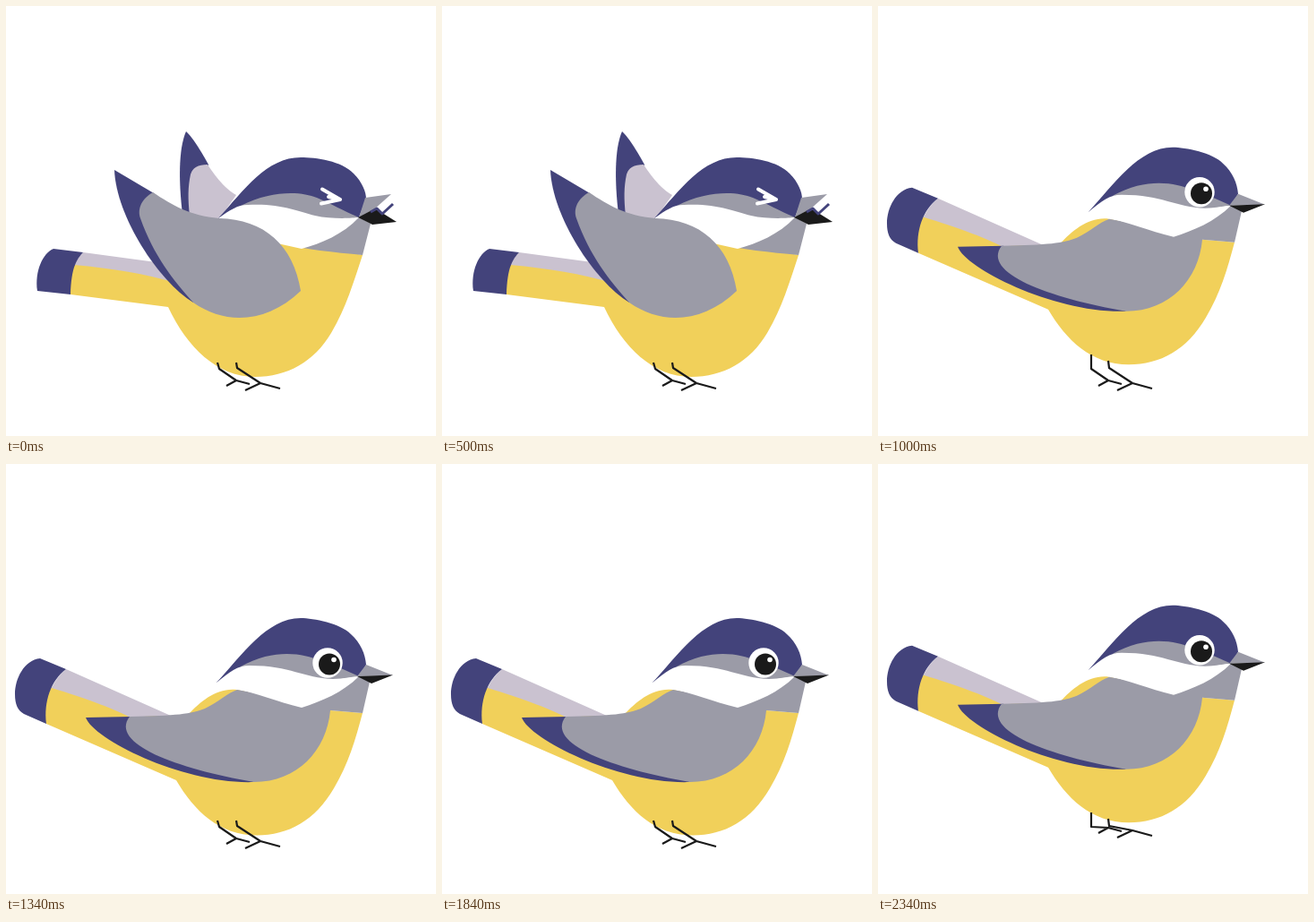
These frames come from a looping animation (480x480 px, 2510 ms). An HTML page:

```html
<!DOCTYPE html>
<html lang="en">
<head>
<meta charset="utf-8">
<title>Hopping bird</title>
<style>
html, body { margin: 0; width: 100%; height: 100%; overflow: hidden; background: #fff; }
svg { display: block; width: 100vw; height: 100vh; }
.blue { fill: #43437b; }
.grey { fill: #9b9ba7; }
.gold { fill: #f1d05a; }
.lilac { fill: #cac2d0; }
.ink { fill: #1a1a1a; }
.white { fill: #fff; }
.line { fill: none; stroke-linejoin: round; }
#legs { stroke: #1a1a1a; stroke-width: 2.2; }
</style>
</head>
<body>
<svg viewBox="0 0 480 480">
  <g id="rest">
    <path class="gold" d="M45 290L190 353C210 387 238 414.500 280 414.500C315 414.500 345 398 366 362C382 335 390 308 398 278L362 275L258 252C236 249 217 265 204 279L184 282L60 240L36 266Z"/>
    <path class="lilac" d="M67 229L184 281L138 282.500C115 271 90 262 51 250Q57 237 67 229Z"/>
    <path class="blue" d="M38 217L67 229C50 242 42 265 45 290L20 279C13 275 10 268 10 257C10 240 20 219 38 217Z"/>
    <path class="blue" d="M89 283L140 282L180 305L277 355C200 358 98 308 89 283Z"/>
    <path class="grey" d="M138 282C190 281 207 279 222 273C238 265 247 256 258 252L330 265L394 236L406 243L398 278L362 275C358 320 325 355 277 355C190 340 115 312 138 282Z"/>
    <path class="blue" d="M235 244C263 214 291 172 329 172C343 172 374 178 385 190C396 200 401 212 402 224L394 237L300 240Z"/>
    <path class="grey" d="M262 226C300 205 332 212 350 219L376 229L394 237L360 242Z"/>
    <path class="white" d="M235 244C250 232 258 225 272 225C318 225 332 239 365 240C378 240 387 237 394 237C376 255 352 265 330 272C301 265 281 256 257 251Q248 247 235 244Z"/>
    <path class="grey" d="M402 224L432 236L392 237Z"/>
    <path class="ink" d="M392 237L432 235.500L408 245Z"/>
    <circle class="white" cx="359" cy="222" r="16.700"/>
    <circle class="ink" cx="361" cy="223.500" r="12"/>
    <circle class="white" cx="366" cy="218.500" r="2.800"/>
  </g>
  <g id="flap">
    <path class="gold" d="M72 322L181 336C202 381 236 414 278 414C314 414 344 397 363 365C380 336 388 308 398 278L300 260L190 300L86 278L65 300Z"/>
    <path class="lilac" d="M86 275L175 287L190 309C155 299 120 293 76 289Q80 281 86 275Z"/>
    <path class="blue" d="M53 271L86 275C79 283 73 291 72 322L35 318C32 296 41 276 53 271Z"/>
    <path class="blue" d="M201 140Q210 148 226 177L210 235L197 232C193 200 192 160 201 140Z"/>
    <path class="lilac" d="M225 177Q242 203 257 211L238 238L205 234C203 215 203 202 206 188Q209 177 225 177Z"/>
    <path class="grey" d="M303 264L330 267L394 236L407 243L398 278C366 275 335 272 303 264Z"/>
    <path class="blue" d="M237 237C266 205 291 169 329 169C346 169 375 173 388 187C398 197 402 208 402 215L394 236L300 240Z"/>
    <path class="grey" d="M262 223C297 205 330 207 347 214C362 220 377 229 394 236L360 240Z"/>
    <path class="white" d="M237 237C250 228 258 222 270 222C305 220 326 229 345 234C362 238 385 237 394 236C376 255 352 265 330 271L303 265L280 245Z"/>
    <path class="blue" d="M121 183L165 209L200 250L209 331C170 307 123 235 121 183Z"/>
    <path class="grey" d="M164 208C185 222 205 234 238 237C288 238 321 267 329 318C290 355 245 356 209 331C186 305 165 279 150 237C146 225 153 214 164 208Z"/>
    <path class="grey" d="M401 214L430 210L412 226L394 236Z"/>
    <path class="ink" d="M393 236L412 226L436 241L409 244Z"/>
    <path class="line" stroke="#43437b" stroke-width="3" d="M407 230L414 226L420 232L432 221"/>
    <path class="line" stroke="#fff" stroke-width="4" stroke-linecap="round" d="M353 204.500L373 216L352 220.500M360 213L373 216"/>
  </g>
  <path id="legs" class="line"/>
</svg>
<script>
const LOOP = 2510;
const LIFT = -14.3;
const TUCK = -12;
const timeline = [
  [0, "flap"], [170, "rest"], [500, "flap"], [670, "rest"],
  [1000, "rise"], [1170, "hop"], [1340, "rest"], [1670, "flap"],
  [1840, "rest"], [2170, "rise"], [2340, "hop"]
];
const [rest, flap, legs] = ["rest", "flap", "legs"].map(id => document.getElementById(id));

function legPath(raised, tuck) {
  const hips = raised ? ["M238 389L238 405", "M257 396L258 404"] : ["M236 398L238 405", "M257 398L258 404"];
  const y = value => value + tuck;
  return `${hips[0]}L257 ${y(418)}L272 ${y(422)}M257 ${y(418)}L246 ${y(424)}` +
    `${hips[1]}L284 ${y(421)}L306 ${y(427)}M284 ${y(421)}L267 ${y(429)}`;
}

function draw(now) {
  const time = now % LOOP;
  const pose = timeline.findLast(([start]) => time >= start)[1];
  const raised = pose === "rise" || pose === "hop";
  flap.style.display = pose === "flap" ? "" : "none";
  rest.style.display = pose === "flap" ? "none" : "";
  rest.setAttribute("transform", `translate(0 ${raised ? LIFT : 0})`);
  legs.setAttribute("d", legPath(raised, pose === "hop" ? TUCK : 0));
}

const origin = performance.now();
function tick() {
  draw(performance.now() - origin);
  requestAnimationFrame(tick);
}
tick();
</script>
</body>
</html>
```
